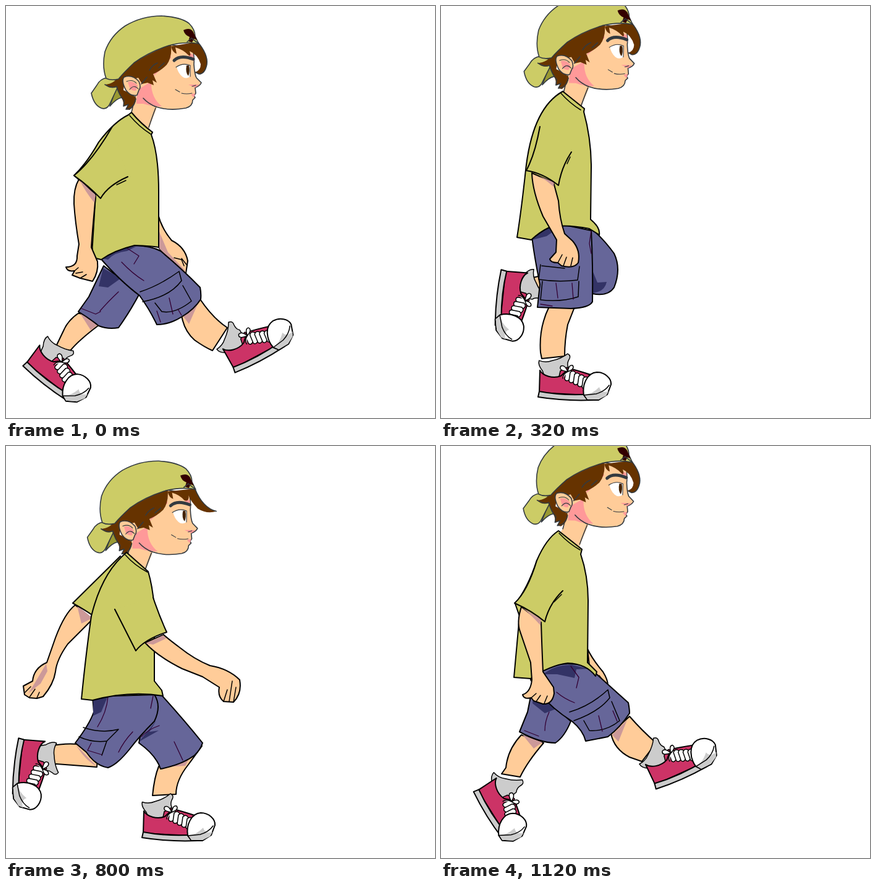
Recreate the animation shown at these times as an HTML page. Size 694x666 px, loop 1280 ms.

```html
<!DOCTYPE html>
<html lang="en">
<head>
<meta charset="utf-8">
<title>Walk cycle</title>
<style>
html, body { margin: 0; width: 100%; height: 100%; overflow: hidden; background: #fff; }
svg { display: block; width: 694px; height: 666px; }
path { stroke: #000; stroke-width: 2; stroke-linejoin: round; stroke-linecap: round; fill: none; }
.skin { fill: #fc9; }
.shade { fill: #c99; stroke: none; }
.shirt { fill: #cc6; }
.shorts { fill: #669; }
.dark { fill: #336; stroke: none; }
.seam { stroke: #303; stroke-width: 1.3; }
.line { stroke-width: 1.5; }
.head path { stroke: #333a40; stroke-width: 1.6; }
.head .flat { stroke: none; }
.head .fine { stroke-width: 1.1; }
.head .brow { stroke-width: 5; }
.pose { visibility: hidden; animation: show 1280ms step-end infinite; animation-delay: calc((var(--i) - 8) * 160ms); }
@keyframes show { 0% { visibility: visible; } 12.5%, 100% { visibility: hidden; } }
</style>
</head>
<body>
<svg id="stage" viewBox="0 0 694 666" xmlns="http://www.w3.org/2000/svg"></svg>
<script>
const CLASSES = { k: 'skin', d: 'shade', t: 'shirt', s: 'shorts', b: 'dark', m: 'seam', l: 'line' };
const part = s => `<path class="${CLASSES[s[0]]}" d="${s.slice(1)}"/>`;
const ink = (fill, d, cls = '') => `<path class="${cls}" style="fill:${fill}" d="${d}"/>`;
const flat = (fill, d) => ink(fill, d, 'flat');

// Local origin is the ball of the foot; heel, toe and sock turn separately.
// A bent foot stretches a little behind the ball.
const lace = i => ink('#fff', `M${-39 + i * 7} ${-46 + i * 3.2}q5-5 9 1l-3 14q-6 4-8-1z`, 'line');
const shoe = (x, y, heel, toe, sock) => `<g transform="translate(${x} ${y})">
  <g transform="rotate(${heel}) translate(${heel > toe + 20 ? -8 : 0} 0)">
    <g transform="translate(-57 -37) rotate(${sock - heel})">
      ${ink('#ccc', 'M-23-27Q-13-22-2-25Q13-27 24-34Q30-30 25-24Q21-18 23-12L17 0L4 9L-14 10L-19-10Q-26-20-23-27Z', 'line')}
    </g>
    ${ink('#c36', 'M-50-36L-48-45L-37-51L-32-46L-42-36Z', 'line')}
    ${ink('#c36', 'M-81-46C-76-37-60-32-47-37L-34-49C-20-46-8-42 4-38L-4-6L-82-10Z')}
    ${ink('#ccc', 'M-82-12L-84-3Q-40 4 6 2L6-8Q-40-4-82-12Z')}
    ${[0, 1, 2, 3, 4].map(lace).join('')}
    ${ink('#fff', 'M-36-44Q-52-46-47-53Q-41-56-36-44Q-34-56-28-54Q-24-48-36-44Q-44-40-44-33', 'line')}
  </g>
  <g transform="rotate(${toe})">
    ${ink('#fff', 'M-10-6C-13-24-4-42 11-43C24-43 35-33 34-23L28-7L14 2L-4 2Z')}
    <path d="M-9-7Q2-6 15-19Q17-9 30-12L26-5L14 1L-4 1Z" style="fill:#ccc;stroke:none"/>
    <path class="line" d="M-10-6L10-8Q24-12 31-22"/>
  </g></g>`;

const BANGS = [
  'M267 65L310 58Q327 78 325 94Q322 110 312 110L306 107Q315 104 315 94Q310 78 297 73Q300 82 296 80Q286 70 274 67L276 77Q269 75 267 65Z',
  'M267 65L311 60Q324 91 346 96Q331 101 316 92Q304 80 301 71Q302 82 294 79Q286 70 274 67L276 77Q269 75 267 65Z'
];
const head = (dx, dy, turn, windy = 0) => `<g class="head" transform="translate(${dx} ${dy}) rotate(${turn} 235 110)">
  ${flat('#fc9', 'M210 140L203 172L196 182L228 210L234 190L244 164Z')}
  <path d="M209 146L203 172M242 165Q237 178 231 196"/>
  ${ink('#993', 'M180 128L187 148Q178 150 168 162Z')}
  ${ink('#cc6', 'M163 116Q152 118 147 128L138 141Q142 160 154 165Q162 168 167 160L185 122Z')}
  ${ink('#fc9', 'M200 110L262 62L302 68Q305 83 304 94Q305 110 308 116L316 124Q314 129 306 132L307 141L304 145L306 148L302 152Q302 162 291 165Q264 170 243 163Q225 157 216 146Z')}
  ${flat('#f99', 'M212 136L235 122Q234 148 252 162Q237 163 222 158L211 158ZM233 124Q248 92 264 72L267 84Q257 92 249 104L240 112ZM295 127L313 127L306 132ZM299 143L306 141L304 148ZM286 70L303 79L304 90Z')}
  <path d="M222 149Q230 158 243 163"/>
  ${flat('#630', 'M184 112Q205 86 267 62Q269 83 260 95Q250 105 238 110L244 124L237 120L239 128L229 124L220 126L214 116L192 122L190 136Q206 143 210 148Q211 160 200 168L194 167L198 159L190 162Q191 153 184 144L178 131Q168 135 160 127Q175 126 184 112Z')}
  <path d="M160 127Q172 134 179 130Q183 144 191 153L190 162L198 159L194 167Q207 166 210 150M219 126L228 115M232 104Q236 96 245 92M247 100L256 92"/>
  ${ink('#fc9', 'M215 122Q204 110 191 115Q186 121 194 136Q202 147 212 144L215 136Q219 132 215 122Z')}
  ${flat('#f99', 'M197 123Q206 120 213 129L210 137Q202 137 200 132Z')}
  <path class="fine" d="M195 122Q205 118 211 125M200 135Q207 126 214 134"/>
  ${flat('#630', BANGS[windy])}
  <path d="${windy ? 'M311 60Q324 91 346 96' : 'M310 58Q327 78 325 94Q322 110 312 110L306 107'}"/>
  ${ink('#cc6', 'M162 117Q155 98 160 74Q169 48 193 32Q220 16 252 16Q283 18 296 28Q306 38 306 49L312 61Q289 57 263 64Q230 75 207 92Q190 108 182 118Q170 121 162 117Z')}
  ${flat('#300', 'M287 39Q298 34 303 42L309 55L304 53L301 59L295 57L297 50Q289 47 287 39Z')}
  <path d="M293 58L300 52L312 61"/>
  ${flat('#fff', 'M276 98Q287 92 298 96L298 114Q291 119 285 114Q278 108 276 98Z')}
  ${flat('#420', 'M292 96h4q2 10-1 17q-5-5-3-17Z')}
  <path class="fine" d="M275 99Q286 91 298 96L298 114M274 135L281 139M284 141Q292 143 301 141M301 130L307 128"/>
  <path class="brow" d="M272 88Q282 78 303 86"/></g>`;

// Eight held poses, parts listed back to front.
const poses = [
  [
    'kM246 337Q252 360 268 379Q290 390 294 412L291 432Q278 430 270 412L248 392Z',
    'dM248 365L262 398L292 430L270 415L248 392Z', 'lM272 407L284 410L288 420M284 408L292 418',
    'kM118 496Q100 508 93 525L80 552L104 557Q118 540 150 516Z', 'dM120 497L150 514L137 524Z',
    [101, 637, 35, 5, 38],
    'sM158 420L134 470L117 494Q135 505 150 517Q165 523 182 520Q200 495 216 465Z',
    'bM157 424L186 440L165 455L150 453Z', 'mM182 462Q165 478 152 493M122 489L145 498L153 494',
    'kM284 500Q288 525 305 540Q322 552 334 557L358 520Q335 505 314 474Z', 'dM287 502L311 480L296 514Z',
    [444, 552, -31, -31, -58],
    'sM152 407Q175 388 210 387Q235 388 250 396Q285 425 314 455Q316 465 315 474Q305 490 285 502Q265 515 244 515Q232 490 216 468Q185 445 152 407Z',
    'bM155 408Q180 389 210 389L196 396Q176 398 165 410Z',
    'lM217 462Q248 452 280 429L284 444Q265 470 221 478M241 480L252 494Q274 498 300 477L286 452',
    'mM195 391L215 404L207 417M187 414Q205 433 223 444M244 493L250 511M264 472L270 498M284 500L278 490',
    head(0, 0, 0),
    'tM203 172Q218 190 237 204L235 208Q247 240 247 300L247 390Q235 388 208 387Q175 395 154 410L146 408Q138 400 140 385L145 304L110 274Q130 255 150 220Q175 187 198 176Z',
    'lM200 177Q215 195 234 207',
    'kM118 280Q109 295 110 320Q112 350 118 385L115 404Q116 422 97 422Q99 430 111 428L107 435L120 440L140 445Q150 430 148 413L138 390Q140 360 145 308Z',
    'dM119 281L145 306L143 318Q128 300 119 281Z', 'lM113 432L124 430M120 440L130 434M111 428L117 423',
    'tM172 195Q140 250 110 274Q133 290 153 311Q165 290 197 276', 'lM179 289L194 282'
  ],
  [
    'kM230 302Q252 320 275 352Q288 371 301 372Q320 382 328 397L330 410L329 425L322 429L304 428L300 412Q283 398 277 382Q255 370 230 350Z',
    'dM231 330L250 358L277 380Q252 372 231 350Z', 'lM304 428L304 417L312 414L311 427M317 428L318 416M323 426L326 412',
    'tM225 255L238 288L228 293',
    'kM46 487Q75 480 103 483L128 500L130 513Q105 515 80 511L45 510Z', 'dM100 484L130 512Q112 505 100 484Z',
    [-9, 556, 93, 85, 95],
    'sM140 432L118 460L98 482Q112 488 124 500Q130 512 152 519Q165 519 172 505Q183 490 190 475Z',
    'bM138 434L160 452L138 462L122 459Z', 'mM162 464Q145 490 135 500M104 482L125 494L140 496',
    'kM227 516Q215 530 215 568L252 565Q262 540 280 515Q294 498 296 484Z', 'dM231 517L292 488L270 512Z',
    [282, 636, 0, 0, -8],
    'sM135 418Q160 392 200 392Q230 398 240 404Q265 430 295 458Q300 470 297 482Q280 505 262 512Q245 515 228 519Q222 505 203 487Q165 465 145 445Q135 430 135 418Z',
    'bM137 418Q160 396 198 394L178 402Q155 407 142 427Z',
    'lM203 462Q240 455 266 433L268 449Q245 475 208 482M224 480L238 499Q262 505 282 486L270 455',
    'mM182 396L202 407L193 424M172 430Q190 446 208 452M228 496L234 512M248 475L254 503',
    head(0, 8, 1.8, 1),
    'tM185 178L218 210Q228 240 228 300L230 385L242 404L240 411Q225 397 190 392Q150 397 134 418L110 414Q118 370 125 308L90 268Q130 220 185 178Z',
    'lM219 210L223 215',
    'kM90 272Q75 280 66 325L54 375L52 398L28 406Q24 412 31 413Q22 422 25 430L48 436Q62 440 78 412L79 385Q85 360 108 325L118 300Z',
    'dM92 274L117 304L108 318Q98 300 92 274Z', 'lM27 421L48 413M25 431L50 422M38 433L54 426',
    'tM180 182Q140 215 87 267Q105 280 118 313Q135 290 168 281', 'lM150 286L163 286'
  ],
  [
    'kM145 440L170 434L170 475L147 468Z', [90, 510, 93, 85, 75],
    'sM240 357Q262 375 280 400Q292 425 280 455Q270 470 245 465Z', 'bM245 464L246 430L253 447L268 446Q265 462 245 464Z',
    'kM175 486Q158 520 161 560L163 570L200 566Q200 540 205 515L216 487Z',
    [241, 635, 0, 0, -5],
    'sM147 372Q175 353 205 355L243 363Q246 420 245 478Q240 488 210 489L156 487L160 450Q150 400 147 372Z',
    'bM148 378Q163 358 192 357L171 372Z',
    'lM161 418L158 442Q190 447 221 443L224 421M163 420L200 424M164 445L161 475Q195 479 222 470L223 445',
    'mM243 363L240 384L243 400M186 448L189 472M212 448L214 474M161 482L180 485',
    head(-3, -33, 1.3),
    'tM197 138L232 166L231 171Q243 215 243 260L242 345Q258 358 256 370L240 360Q200 352 175 358Q160 365 146 378L123 374Q130 330 137 265Q148 165 197 138Z',
    'lM194 141Q208 157 226 168',
    'kM147 270Q148 300 165 340L187 378L186 398L176 409Q177 415 189 415L195 420Q215 425 222 415Q226 395 213 380L200 368Q192 345 190 315L182 285Z',
    'dM149 271L183 285L182 292Q163 275 149 271Z', 'lM189 415L196 402M198 420L203 406M210 420L213 407',
    'tM160 195Q152 240 138 266Q165 270 190 290Q195 260 211 236', 'lM204 255L209 244'
  ],
  [
    'kM128 235Q120 260 120 290Q122 310 130 330L138 290L138 237Z', 'dM128 237L138 238L137 290L129 325Q117 280 128 237Z',
    'kM122 358Q122 374 116 385Q118 398 125 401Q132 405 141 402L141 362Z', 'dM123 360L140 362L140 376L124 378Z',
    'lM121 390L129 385M127 400L134 388M134 402L138 391',
    'tM153 180L122 234L140 238',
    'kM272 460Q280 490 303 502L325 510L343 480Q325 468 303 440Z', 'dM275 461L297 445L280 473Z',
    [420, 519, -26, -26, -55],
    'sM230 355L257 355Q290 395 311 425Q312 432 308 440Q285 462 262 465L243 463Q238 440 213 427Z',
    'bM214 426L240 388L228 410L238 413Z', 'mM240 400Q225 405 217 416M265 430L272 455',
    'kM125 465Q100 490 98 520L92 530L123 533Q135 508 162 480Z', 'dM127 467L160 480L145 489Z',
    [98, 636, 55, 3, 22],
    'sM138 356L235 353Q240 365 233 380Q215 415 211 430Q205 460 192 478Q170 487 122 465L140 420Q140 390 138 356Z',
    'bM139 358L165 356L160 372Q152 390 140 392Z',
    'lM138 413Q165 420 187 415L184 430L180 441Q150 440 130 433M135 435L125 460M178 441L168 464',
    'mM165 358Q162 385 155 411M235 357L233 374M152 441L140 464',
    head(-3, -52, 1.4),
    'tM195 120L230 150L229 158Q240 190 240 230L240 340L255 353Q195 350 138 360L121 358Q128 300 135 240Q145 185 160 155Q175 128 195 120Z',
    'lM192 123Q207 140 226 152',
    'kM192 272Q195 295 225 325L262 365Q275 375 278 385L265 393Q268 400 285 396L300 397Q314 385 312 375Q300 360 285 350L270 342Q255 325 240 295Q228 280 224 268Z',
    'dM193 273L224 271L229 284Q210 273 193 273Z', 'lM285 396L290 381M297 395L300 380M306 389L305 377',
    'tM164 205Q170 230 172 281Q195 268 230 269L227 235L229 217'
  ],
  [
    'kM118 268Q102 290 100 325L97 365Q80 385 78 400Q85 412 105 408L114 375Q118 340 138 290Z', 'dM118 270L140 284L130 310Z',
    'lM82 401L93 393M90 408L100 397', 'tM172 195L112 268L142 282',
    'kM266 500Q270 525 287 540Q304 552 316 557L340 520Q317 505 296 474Z', 'dM269 502L293 480L278 514Z',
    [426, 552, -31, -31, -58],
    'sM225 396L250 396Q275 425 297 455L297 474Q285 490 267 502L228 513Q222 490 200 468Z', 'bM203 468L232 430L222 452Z',
    'kM100 496Q82 508 75 525L62 552L86 557Q100 540 132 516Z', 'dM102 497L132 514L119 524Z',
    [83, 637, 35, 5, 38],
    'sM136 400L240 396Q245 415 235 430Q205 470 195 490Q180 520 160 521Q130 515 99 494L118 465Q135 430 136 400Z',
    'bM137 402L165 400L154 425L138 432Z',
    'lM122 458Q150 466 176 460L164 481Q138 480 113 472M164 481L154 506', 'mM164 403Q160 430 148 456M236 399L233 418',
    head(-5, 0, 0),
    'tM196 168L231 198L230 206Q241 235 241 275L241 385L254 400Q195 395 138 407L120 405Q130 345 136 287Q146 232 161 202Q176 176 196 168Z',
    'lM193 171Q208 188 227 200',
    'kM195 312Q205 340 240 362L285 392Q298 400 302 410L292 420Q297 426 312 420L328 420Q340 405 335 397Q322 380 305 374L292 368Q272 352 252 330Q238 312 230 300Z',
    'dM198 313L230 302L238 314Z', 'lM312 420L315 405M325 420L326 403',
    'tM168 250Q175 280 186 322Q205 305 242 298Q235 275 232 255'
  ],
  [
    'kM112 257Q95 270 80 310L66 350Q45 359 43 380L28 388L30 402L38 407L50 408L60 405Q77 385 80 365Q82 345 100 320Q120 300 140 280Z',
    'dM115 258L140 278L122 287ZM65 352L46 384L36 400L56 384L67 364Z', 'lM30 399L40 389M38 406L47 393M50 407L54 398',
    'tM185 178L108 254Q128 265 142 275',
    'kM247 518Q240 535 237 565L275 563Q275 540 295 515L317 485Z', 'dM252 519L298 502L290 517Z',
    [304, 636, 0, 0, -8],
    'sM230 402L252 403Q290 445 318 480Q315 490 305 500Q285 515 250 522Q243 500 215 480Z',
    'bM215 478L243 444L232 462L247 460Z', 'mM248 452Q230 458 219 470M272 478L286 508',
    'kM70 485Q95 480 117 482L148 505L147 519Q110 516 68 513Z', 'dM113 483L147 518Q128 508 113 483Z',
    [13, 556, 93, 85, 95],
    'sM140 405L240 402Q252 420 240 445Q215 470 200 490Q180 515 165 520Q145 517 130 495L112 480Q135 450 142 430Z',
    'bM141 407L165 404L154 430L141 436Z',
    'lM125 455Q155 465 182 458L163 477Q140 480 118 470M163 477L155 500', 'mM165 405Q163 430 148 454M238 404L234 424M138 480L132 492L155 499M205 462Q190 478 182 495',
    head(-6, 8, .8, 1),
    'tM195 172L230 203Q238 230 240 265L240 380L252 395L254 404Q200 395 140 411L122 409Q130 330 138 275Q155 205 195 172Z',
    'lM193 176Q208 193 229 204',
    'kM225 318Q245 340 285 360L318 373L345 390Q342 405 352 413L368 414Q382 400 378 378Q360 360 330 355Q305 345 280 325Q260 310 255 305Z',
    'dM226 319L254 306L259 311L238 321Z', 'lM352 413L358 394M361 413L366 380M368 414L372 390',
    'tM176 264L210 331Q225 312 260 301Q248 275 238 245'
  ],
  [
    'kM183 486Q166 520 169 560L171 570L208 566Q208 540 213 515L224 487Z', [249, 635, 0, 0, -5],
    'sM150 375L240 365L247 483Q205 492 164 485Z',
    'kM150 440L200 430L210 470L152 472Z', [96, 510, 93, 85, 75],
    'sM146 370Q190 355 240 360Q268 385 290 415Q296 435 282 460Q270 470 245 465Q215 475 174 474L162 435Q149 405 146 370Z',
    'bM147 373L174 364L165 386L150 396Z', 'lM165 419Q190 425 217 419L219 443L177 446', 'mM175 365L180 417M250 464L247 448M190 447L194 470',
    head(-3, -34, 1.5),
    'tM196 138L231 167L230 172Q242 215 242 260L241 345L255 360L255 368Q200 352 146 377L122 374Q130 330 137 265Q148 165 196 138Z',
    'lM193 141Q207 157 225 168',
    'kM170 272Q175 305 195 338L222 372L224 390L214 402Q220 409 229 406L236 411Q255 414 261 404Q264 386 250 372L236 360Q222 335 216 305L208 278Z',
    'dM171 273L209 279L211 289Q190 277 171 273Z', 'lM229 406L236 392M240 411L243 397M251 410L253 397',
    'tM162 200Q163 240 165 276Q190 272 215 281Q218 250 220 232'
  ],
  [
    'kM237 328Q245 345 262 365Q270 378 270 387L260 385L240 355Z', 'lM256 371L266 385',
    'kM130 467Q108 490 105 520L98 530L128 535Q140 510 166 480Z', 'dM132 467L164 479L150 489Z',
    [103, 636, 55, 3, 23],
    'sM148 390L140 430L127 462Q160 480 185 480Q200 470 210 445Z', 'bM150 395L186 425L168 432L148 416Z', 'mM175 430Q168 445 168 460M135 460L158 469',
    'kM275 465Q280 490 305 503L325 510L348 480Q325 460 305 437Z', 'dM277 467L301 443L287 478Z',
    [424, 519, -27, -27, -53],
    'sM145 378Q170 352 205 352Q230 352 242 360Q275 390 303 415Q305 425 305 432Q290 455 270 470L234 477Q230 460 212 445Q180 425 160 400Z',
    'bM165 369Q185 353 212 354L239 360L219 361L216 375L188 369Z',
    'lM208 430Q242 420 270 394L273 407Q255 430 215 444M231 444L240 460Q267 462 289 444L276 413',
    'mM210 356L223 374L219 391M187 398Q200 409 216 415M255 436L261 461M278 428L285 445',
    head(-4, -37, 1.8),
    'tM190 137L228 167L226 175Q238 210 238 250L237 350L252 365L250 372Q235 352 205 351Q175 355 145 376L118 374L127 275L120 255Q140 230 155 185Q170 150 190 137Z',
    'lM191 141Q207 158 225 168',
    'kM130 260Q122 285 128 300L145 350L147 378Q145 398 132 402Q134 410 146 407L150 412L165 417Q180 418 183 400L182 390L165 365Q163 320 162 285Z',
    'dM131 261L162 280L161 290Q143 270 131 261Z', 'lM146 407L154 400M154 413L161 403M167 416L172 404',
    'tM155 185Q140 235 119 254Q145 265 168 284Q175 255 197 234', 'lM183 252L195 240'
  ]
];

const draw = p => Array.isArray(p) ? shoe(...p) : p[0] === '<' ? p : part(p);
document.getElementById('stage').innerHTML = poses
  .map((pose, i) => `<g class="pose" style="--i:${i}">${pose.map(draw).join('')}</g>`).join('');
</script>
</body>
</html>
```
